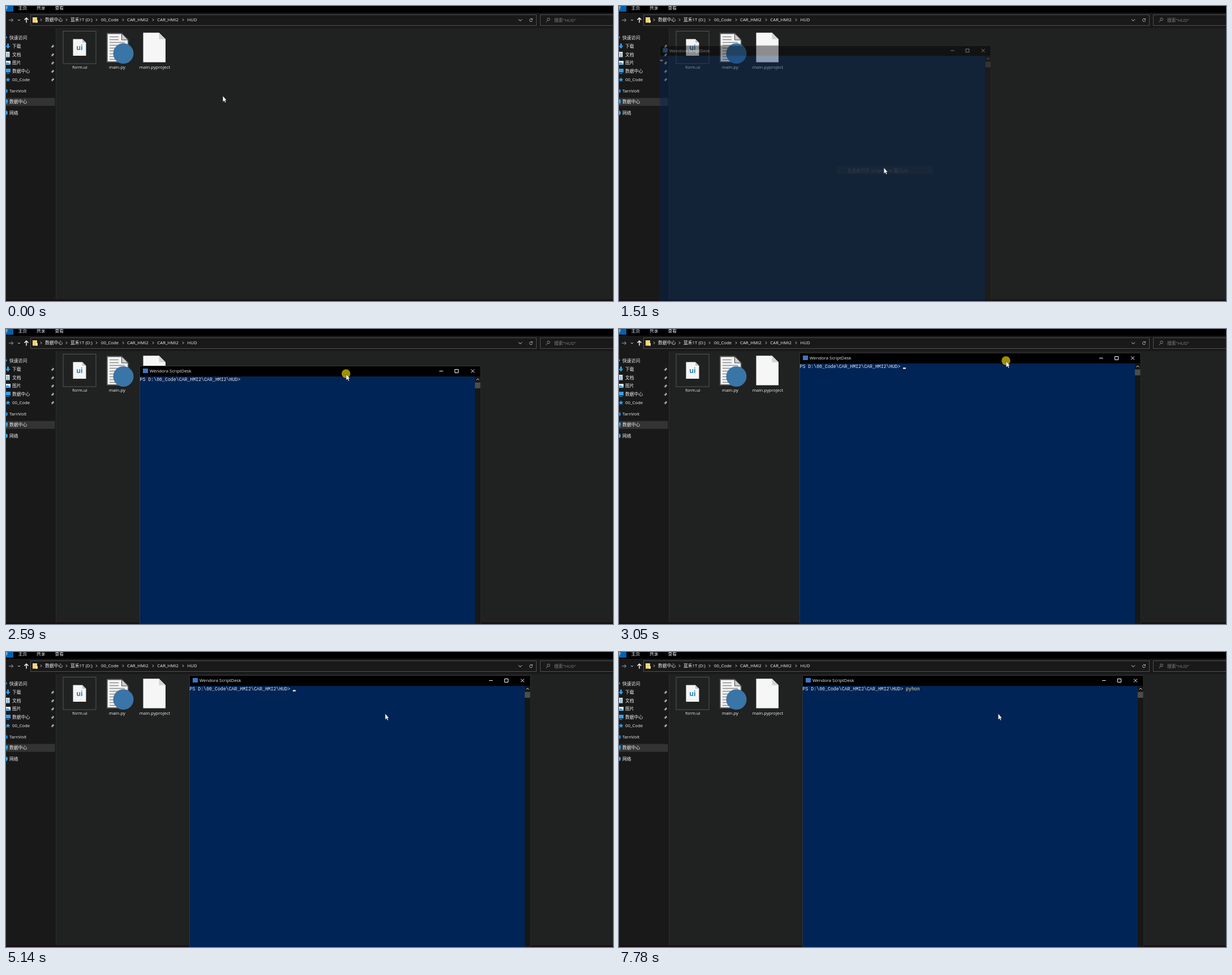
These frames come from a looping animation (1073 by 522 pixels, 8 s). An HTML page:

```html
<!DOCTYPE html>
<html lang="zh-CN">
<head>
<meta charset="utf-8">
<style>
html, body { margin: 0; height: 100%; overflow: hidden; background: #202121; }
svg { display: block; width: 1073px; height: 522px; }
text { font: 7.8px "Open Sans", "Noto Sans CJK SC", "Noto Sans CJK", sans-serif; fill: #f2f2f2; white-space: pre; }
.mono { font: 8.24px "Liberation Mono", monospace; fill: #e6e8ec; }
.line { fill: none; stroke: #ddd; }
</style>
</head>
<body>
<svg viewBox="0 0 1073 522">
  <rect width="1073" height="522" fill="#202121"/>
  <rect y="38" width="88" height="484" fill="#191919"/>
  <rect x="88" y="39" width="1" height="480" fill="#2c2c2c"/>
  <rect width="1073" height="39" fill="#191919"/>
  <rect width="1073" height="12" fill="#000"/>
  <rect width="13" height="10" fill="#0063b1"/>
  <rect y="519.500" width="1073" height="2.500" fill="#170d13"/>

  <g class="line">
    <rect x="43.500" y="15.500" width="894" height="19" stroke="#505050"/>
    <rect x="944.500" y="15.500" width="140" height="19" stroke="#505050"/>
    <path d="M5 25h7.500M9.500 22l3 3-3 3" stroke="#a8a8a8"/>
    <path d="M21 24l2 2 2-2M906 23.500l3 3 3-3"/>
    <path d="M36 29.500v-8M32.500 24.500l3.500-3.500 3.500 3.500" stroke="#fff" stroke-width="1.400"/>
    <path d="M930 23.500a2.500 2.500 0 1 0 .5 2M930.500 22v1.800h-2" stroke="#bbb"/>
    <path d="M957.500 25.500l-3 3" stroke="#888"/>
    <circle cx="959" cy="23.500" r="2.300" stroke="#888"/>
  </g>
  <path d="M47 20h8v9.500h-8z" fill="#f4d675"/><path d="M53 25h3v4.500h-3z" fill="#fbe9a8"/>
  <rect y="162.700" width="86.500" height="14" fill="#333"/>

  <g fill="#31a0f0">
    <path d="M0 53l2 2.500-2 2.500z"/>
    <path d="M2 66.500h3v4h2.500L3.500 75.500-.5 70.500h2.500z"/>
    <path d="M0 81h6.500v9.500h-6.500z" fill="#dce6ec"/><path d="M1 84h4M1 86.500h4M1 89h4" stroke="#5b92b5"/>
    <path d="M0 97h8v7h-8z" fill="#e3eef4"/><path d="M0 100.500l3-1 5 3v1H0z"/>
    <path d="M0 111h8v6.500h-8zM1 119h5v1h-5z"/>
    <path d="M3.500 126l1.200 3h3l-2.300 2 .9 3-2.800-1.800-2.800 1.800.9-3-2.300-2h3z"/>
    <circle cx="0" cy="150.500" r="3.200" fill="#1683d8"/>
    <path d="M0 165.500h3v6h-3zM0 172.500h3v1h-3z"/>
    <circle cx="-1" cy="189" r="4"/>
  </g>
  <g id="labels"></g>

  <rect x="101" y="44.500" width="58" height="57.500" class="line" style="stroke:#555"/>
  <path d="M118.500 58.500h16.500l6.500 6.500v23h-23z" fill="#f5f5f5"/><path d="M135 58.500v6.500h6.500z" fill="#c4c4c4"/>
  <text x="130" y="77.500" text-anchor="middle" style="font-size:12px;font-weight:700;fill:#2484bd">ui</text>
  <path d="M178.800 48.500h25.700l11.500 11.500v39h-37.200z" fill="#f4f4f4" stroke="#555" stroke-width="1.800"/>
  <path d="M204.500 48.500v11.500h11.500z" fill="#ccc" stroke="#444"/>
  <path id="pageLines" stroke="#8c8c8c" stroke-width="1.300"/>
  <circle cx="207.500" cy="84" r="18" fill="#3a75a8"/>
  <path d="M242.500 47.300h28l11.500 11.500v40.700h-39.500z" fill="#f6f6f6"/><path d="M270.500 47.300v11.500h11.500z" fill="#d2d2d2"/>

  <g id="win">
    <rect x=".5" y=".5" width="602.500" height="520" fill="#000" stroke="#333"/>
    <rect x="1" y="19" width="592" height="513" fill="#012456"/>
    <rect x="593" y="19" width="9.500" height="513" fill="#171717"/>
    <rect x="593" y="29.500" width="9.500" height="10.500" fill="#4d4d4d"/>
    <path class="line" d="M595.500 25.500l2.500-2.500 2.500 2.500"/>
    <path class="line" style="stroke:#fff" d="M530 9.500h6.500M557.500 6.500h6v6h-6zM586 6.500l6 6m0-6l-6 6"/>
    <rect x="6" y="5" width="9" height="8" fill="#3d78c2"/>
    <text x="18" y="12.300">Wendora ScriptDesk</text>
    <text id="prompt" class="mono" x=".5" y="27.300">PS D:\00_Code\CAR_HMI2\CAR_HMI2\HUD&gt;</text>
    <text id="typed" class="mono" x="183" y="27.300" style="fill:#f3eaa6"></text>
    <rect id="caret" y="26.300" width="5" height="2.400" fill="#f6ecd0"/>
  </g>

  <g id="menu">
    <rect id="menuBox" x="383.500" y="158.500" width="172.500" height="197.500" fill="#2b2b2b" stroke="#4a4a4a"/>
    <rect id="hover" x="384.500" width="170.500" height="14.500" fill="#414141"/>
    <g id="items"></g>
  </g>

  <circle id="click" r="7.700" fill="#ffe600" opacity=".63"/>
  <path id="cursor" d="M.3 1V11.700L2.700 9.500 4.300 13 5.900 12.300 4.300 8.900H7Z" fill="#fff" stroke="#111" stroke-width=".4"/>
</svg>
<script>
const $ = id => document.getElementById(id);
const clamp = (v, a = 0, b = 1) => Math.min(b, Math.max(a, v));
const ramp = (t, a, b) => clamp((t - a) / (b - a));
const show = (el, on) => el.setAttribute('visibility', on ? 'inherit' : 'hidden');
const move = (el, [x, y], extra = '') => el.setAttribute('transform', `translate(${x} ${y})${extra}`);
const label = (x, y, s, attrs = '') => `<text x="${x}" y="${y}" ${attrs}>${s}</text>`;
const row = (y, list) => list.map(([x, s]) => label(x, y, s)).join('');

const crumbs = [[69, '数据中心'], [114, '蓝禾1T (D:)'], [168, '00_Code'], [214, 'CAR_HMI2'], [267.3, 'CAR_HMI2'], [320.5, 'HUD']];
const sidebar = [[6, 56, '快速访问'], [11, 71, '下载'], [11, 86, '文档'], [11, 100.5, '图片'], [11, 115.3, '数据中心'],
  [11, 130, '00_Code'], [6, 150, 'TarnVolt'], [6, 169.5, '数据中心'], [6, 189, '网络']];
const pin = y => `<path fill="#b4b4b4" d="M82.500 ${y - 3}l2.800 2.800-1 .6-1.300 1.300-.3 1.700-1.400-1.400-2.300 2.200 2-2.600-1.400-1.400 1.700-.3 1.300-1.300z"/>`;
const chevron = x => `<path class="line" d="M${x - 1} 22.500l2 2-2 2"/>`;

$('labels').innerHTML =
  row(6.3, [[-4, '件'], [21.5, '主页'], [54, '共享'], [86.5, '查看']]) +
  row(27.3, crumbs) + [62, 107, 160, 207, 260, 313].map(chevron).join('') +
  label(969, 27.5, '搜索"HUD"', 'style="fill:#808080"') +
  sidebar.map(([x, y, s]) => label(x, y + 2.8, s)).join('') +
  sidebar.slice(1, 6).map(s => pin(s[1])).join('') +
  [[130.5, 'form.ui'], [196.5, 'main.py'], [263, 'main.pyproject']]
    .map(([x, s]) => label(x, 111, s, 'text-anchor="middle"')).join('');
$('pageLines').setAttribute('d', Array.from({ length: 9 }, (_, i) =>
  `M183 ${54.5 + i * 5}h${i > 1 ? 27 : 16}`).join(''));

// Context menu: '-' is a separator, a trailing '>' marks a submenu.
const menuItems = ['查看(V)>', '排序方式(O)>', '分组依据(P)>', '刷新(E)', '-', '自定义文件夹(F)...', '-', '粘贴(P)',
  '粘贴快捷方式(S)', '撤消 重命名(U)', '在此处打开 ScriptDesk 窗口(S)', '-', '授予访问权限(G)>', '-', '新建(W)>', '-', '属性(R)'];
const rowTops = [];
let nextTop = 159.5;
$('items').innerHTML = menuItems.map(s => {
  const y = nextTop;
  nextTop += s === '-' ? 4 : 14.5;
  if (s === '-') return `<path d="M388 ${y + 2}h163" stroke="#555"/>`;
  rowTops.push(y);
  const sub = s.endsWith('>');
  return label(404, y + 10, sub ? s.slice(0, -1) : s) +
    (sub ? `<path class="line" d="M547 ${y + 5}l2 2-2 2"/>` : '');
}).join('');
const chosen = [...$('items').querySelectorAll('text')].find(e => e.textContent.includes('ScriptDesk'));

const path = [[0, 383, 158], [485, 383, 158], [890, 468, 285], [1580, 468, 285], [1830, 446, 90], [1900, 438, 57],
  [1980, 434, 82], [2050, 428, 76], [2280, 428, 76], [2590, 601, 79], [2820, 652, 70], [3050, 684, 56],
  [3205, 689, 55], [3445, 689, 55], [3820, 670, 108]];
function pointer(t) {
  const i = path.findIndex(k => k[0] > t);
  if (i < 0) return path.at(-1).slice(1);
  const [t0, x0, y0] = path[i - 1], [t1, x1, y1] = path[i], p = (t - t0) / (t1 - t0);
  return [x0 + (x1 - x0) * p, y0 + (y1 - y0) * p].map(Math.round);
}

const clicks = [[90, 240], [1190, 1350], [2280, 3520]];
const blinks = [2450, 2970, 3520, 4050, 4600, 5140, 5690, 6150, 7780];
const keys = [6380, 6690, 6920, 7070, 7240];
const STEP = 540 / 7;

function draw(t) {
  const q = Math.max(0, 2050 + Math.floor((t - 2050) / STEP + .1) * STEP);
  const tip = pointer(q);
  move($('cursor'), tip);
  move($('click'), tip);
  show($('click'), clicks.some(([a, b]) => t >= a && t < b));

  const closing = t >= 1270;
  show($('menu'), t >= 240 && t < 1590);
  $('menu').setAttribute('opacity', closing ? 1 - ramp(q, 1270, 1550) : ramp(q, 80, 400));
  show($('menuBox'), !closing);
  for (const e of $('items').children) show(e, !closing || e === chosen);
  const hovered = rowTops.find(y => tip[1] >= y && tip[1] < y + 14.5);
  show($('hover'), hovered !== undefined);
  if (hovered !== undefined) $('hover').setAttribute('y', hovered);

  const open = ramp(q, 1400, 1660), scale = .95 + .05 * open;
  const [gx, gy] = pointer(clamp(q, 2280, 3440));
  show($('win'), open > 0);
  $('win').setAttribute('opacity', open);
  move($('win'), [gx - 365, gy - 14], ` translate(301.5 266) scale(${scale}) translate(-301.5 -266)`);

  const ready = t >= 1910, count = keys.filter(k => t >= k).length;
  show($('prompt'), ready);
  $('typed').textContent = 'pyhon'.slice(0, count);
  $('caret').setAttribute('x', ready ? 183 + count * 4.944 : 1);
  show($('caret'), blinks.filter(b => t >= b).length % 2 === 0);
}

function tick() {
  draw(performance.now() % 8000);
  requestAnimationFrame(tick);
}
tick();
</script>
</body>
</html>
```
